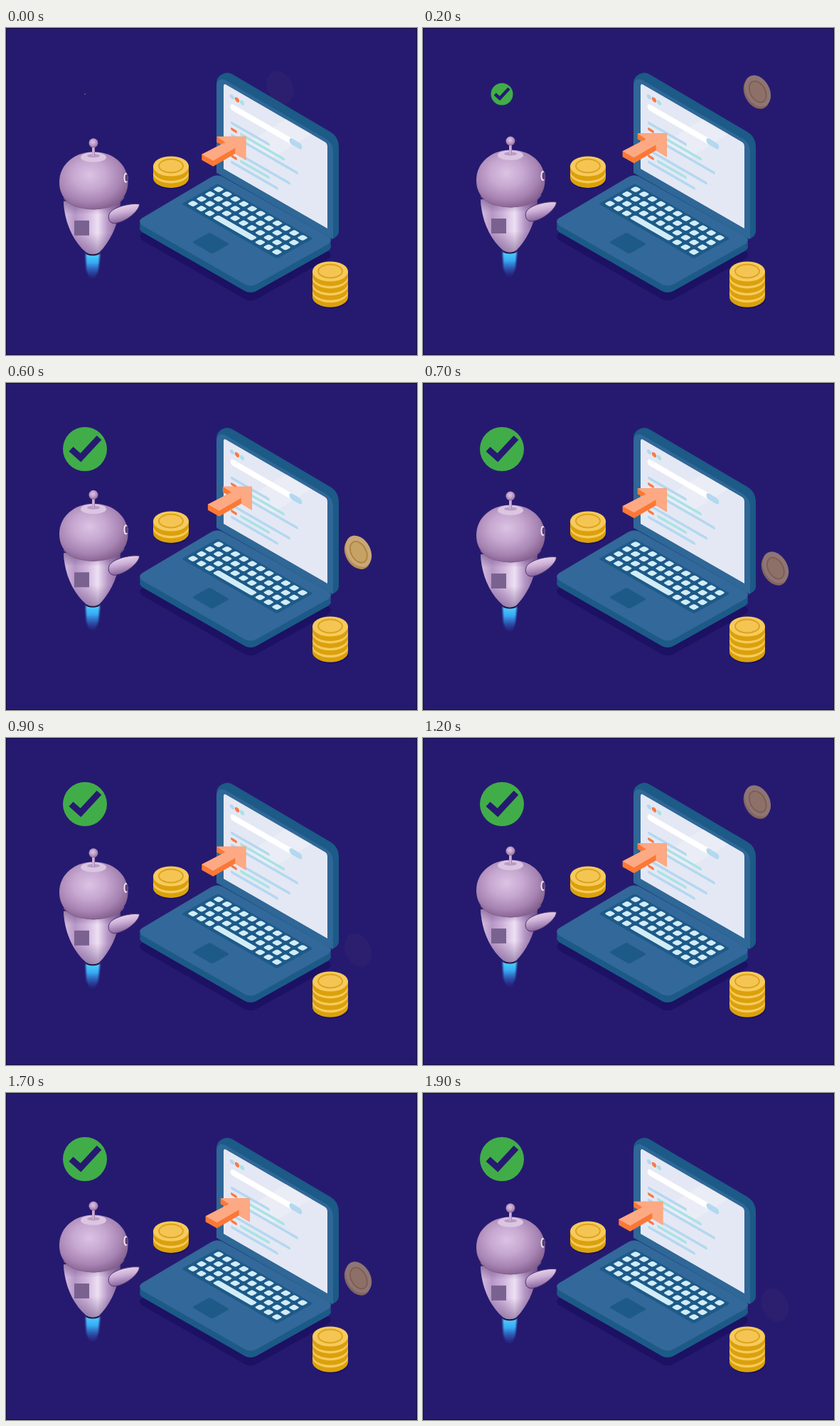
Write an HTML page that moves like this. It is 578 by 460 pixels and loops after 2000 ms.

```html
<!DOCTYPE html>
<html lang="en">
<head>
<meta charset="utf-8">
<title>Robot and laptop</title>
<style>
  html, body { margin: 0; width: 100%; height: 100%; overflow: hidden; background: #261a70; }
  svg { display: block; width: 100vw; height: 100vh; }
</style>
</head>
<body>
<svg viewBox="0 0 578 460">
  <defs>
    <radialGradient id="headFill" cx=".44" cy=".4" r=".62">
      <stop offset="0" stop-color="#dcc3e3"/>
      <stop offset=".4" stop-color="#c6a7d0"/>
      <stop offset=".75" stop-color="#a784b3"/>
      <stop offset="1" stop-color="#85618f"/>
    </radialGradient>
    <linearGradient id="bodyFill">
      <stop offset="0" stop-color="#d6bfe0"/>
      <stop offset=".2" stop-color="#b697c6"/>
      <stop offset=".4" stop-color="#cfb4db"/>
      <stop offset=".6" stop-color="#eee0f4"/>
      <stop offset=".78" stop-color="#b495c4"/>
      <stop offset="1" stop-color="#82609a"/>
    </linearGradient>
    <linearGradient id="bodyShade" x2="0" y2="1">
      <stop offset="0" stop-color="#5b3a74" stop-opacity=".5"/>
      <stop offset=".25" stop-color="#5b3a74" stop-opacity="0"/>
      <stop offset=".6" stop-color="#5b3a74" stop-opacity="0"/>
      <stop offset="1" stop-color="#5b3a74" stop-opacity=".5"/>
    </linearGradient>
    <linearGradient id="armFill" x2=".3" y2="1">
      <stop offset="0" stop-color="#f3e8f6"/>
      <stop offset=".5" stop-color="#ceb1d8"/>
      <stop offset="1" stop-color="#84619a"/>
    </linearGradient>
    <linearGradient id="flameFill" x2="0" y2="1">
      <stop offset="0" stop-color="#4fcfff"/>
      <stop offset=".35" stop-color="#36a9f3"/>
      <stop offset="1" stop-color="#2c5cc8" stop-opacity="0"/>
    </linearGradient>
    <filter id="soft" x="-40%" width="180%"><feGaussianBlur stdDeviation="1.3"/></filter>
    <path id="slab" d="M192 267L288 210Q296 205 304 209L453 293Q461 298 453 304L353 360Q344 365 335 360L192 278Q184 272 192 267Z"/>
    <path id="torso" d="M81 244C82 273 94 300 113 316Q122 321 131 316C147 300 160 274 161 244Z"/>
  </defs>

  <rect width="578" height="460" fill="#261a70"/>
  <rect x=".5" y=".5" width="577" height="459" fill="none" stroke="#130c42"/>

  <!-- laptop -->
  <use href="#slab" y="21" fill="#1c1163"/>
  <path fill="#1c5a87" d="M296 78Q296 67 308 63.500Q314 62 320 66L456 146Q468 153 468 168V287Q467 294 458 297L296 204Z"/>
  <path fill="#2f6797" d="M296 82Q297 69 308 73L450 156Q460 162 460 174V297L296 203Z"/>
  <path fill="#e4e8f4" d="M306 82Q306 77.500 310 80L448 160Q452 162 452 167V282L306 198Z"/>
  <path fill="#fff" opacity=".2" d="M338 162L394 128L430 149L374 183Z"/>
  <g id="page" transform="matrix(1 .575 0 1 306 79)" stroke-linecap="round"></g>
  <g fill="#1c5a87">
    <use href="#slab" y="9.500"/><use href="#slab" y="5"/>
  </g>
  <use href="#slab" fill="#33689a"/>
  <g id="deck" transform="matrix(1.18 .68 -1.2 .67 299 227)" fill="#d2ecf7">
    <rect x="-6.500" y="-5.500" width="113.500" height="42.500" rx="2" fill="#1d5a88"/>
    <rect x="40" y="50" width="24" height="20.500" rx="2" fill="#1d5a88"/>
  </g>

  <g id="arrow">
    <path fill="#fb7836" d="M296 153H337V186L322 177L291 195L275 186V178L302 164L296 161Z"/>
    <path fill="#fda983" d="M296 153H337V186L322 177V169L291 187L275 178L308 161Z"/>
  </g>

  <g id="stacks"></g>

  <g id="coin">
    <g transform="rotate(-29)">
      <ellipse cx="-1.500" cy="1" rx="16.500" ry="23.500" fill="#dfae50"/>
      <ellipse cx="1.500" cy="-1" rx="16.500" ry="23.500" fill="#f6d07a"/>
      <ellipse cx="1" rx="10.500" ry="16" fill="#f3c864" stroke="#d9a235" stroke-width="2"/>
    </g>
  </g>

  <g id="robot">
    <path filter="url(#soft)" fill="url(#flameFill)" d="M112 318H132L130 340Q127 352 122 354Q116 352 113 340Z"/>
    <ellipse cx="122" cy="317" rx="9.500" ry="3.500" fill="#23143f"/>
    <use href="#torso" fill="url(#bodyFill)"/>
    <use href="#torso" fill="url(#bodyShade)"/>
    <rect x="96" y="271" width="21" height="21" fill="#7a6290"/>
    <path fill="url(#headFill)" d="M75 217C75 191 98 174.500 123 174.500C150 174.500 171 191 171.500 217C171.500 241 154 254 123 255.500C93 254 75 242 75 217Z"/>
    <path fill="none" stroke="#86618f" stroke-width="1.200" d="M81 239Q92 254 123 255Q156 254 166 238"/>
    <ellipse cx="168.500" cy="211" rx="3" ry="7" fill="#efe4f4"/>
    <ellipse cx="169.500" cy="211" rx="2" ry="5" fill="#5d3f78"/>
    <ellipse cx="123" cy="182" rx="18" ry="7" fill="#dbc6e2"/>
    <ellipse cx="123" cy="180" rx="9" ry="2.500" fill="#bb9cc5"/>
    <path stroke="#b391bf" stroke-width="4" d="M123 166V180"/>
    <path stroke="#e2d0e8" stroke-width="1.200" d="M122.500 168V180"/>
    <circle cx="123" cy="162" r="6.500" fill="url(#headFill)"/>
    <path fill="url(#armFill)" stroke="#4f3268" d="M145 262C149 252 176 246 187.500 248C188 256 170 273 153 275C145 275 143 268 145 262Z"/>
  </g>

  <g id="badge">
    <circle r="31" fill="#41ad49"/>
    <path fill="none" stroke="#261a70" stroke-width="9" d="M-19.500 0L-6 12L20 -16"/>
  </g>
</svg>

<script>
const $ = id => document.getElementById(id);

function add(parent, tag, attrs) {
  const el = document.createElementNS('http://www.w3.org/2000/svg', tag);
  for (const name in attrs) el.setAttribute(name, attrs[name]);
  parent.append(el);
}

function bar(x1, x2, y, stroke, width = 4) {
  add($('page'), 'path', { d: `M${x1} ${y}H${x2}`, stroke, 'stroke-width': width });
}

function drawPage() {
  const blue = '#b3d8f0', teal = '#a6e3e5', orange = '#fa7a45';
  [blue, orange, teal].forEach((fill, i) =>
    add($('page'), 'circle', { cx: 12 + 7 * i, cy: 11, r: 3.2, fill }));
  bar(14, 106, 25.5, '#fff', 9);
  bar(97, 106, 25.5, blue, 9);
  for (const [y, first, second, third] of [[48, 63, 84, 103], [86, 92, 63, 75]]) {
    bar(12, first, y, blue);
    bar(12, 17, y + 8.6, orange);
    bar(25, second, y + 8.6, teal);
    bar(12, third, y + 17.2, blue);
  }
}

function drawKeys() {
  const key = (col, row, span = 1) => add($('deck'), 'rect', {
    x: col * 10 - 3.3, y: row * 10 - 3.3, width: span * 10 - 3.4, height: 6.6, rx: 1.8
  });
  for (let row = 0; row < 4; row++)
    for (let col = 0; col < 11; col++)
      if (row < 3 || col < 3 || col > 7) key(col, row);
  key(3, 3, 5);
}

function drawStack(cx, top, count) {
  const g = $('stacks'), step = 9.9, rx = 25, ry = 14, rim = 6.5;
  add(g, 'ellipse', { cx: cx + 1, cy: top + step * (count - 1) + rim + 2, rx, ry, fill: '#1c1163' });
  for (let i = count - 1; i >= 0; i--) {
    const y = top + step * i;
    add(g, 'path', {
      d: `M${cx - rx} ${y}v${rim}a${rx} ${ry} 0 0 0 ${2 * rx} 0v${-rim}Z`, fill: '#dba10c'
    });
    add(g, 'ellipse', { cx, cy: y, rx, ry, fill: '#f7ca5c' });
  }
  add(g, 'ellipse', { cx, cy: top - 0.5, rx: 17, ry: 9.5, fill: '#f5c554', stroke: '#dba51e', 'stroke-width': 2 });
}

const ease = u => u * u * (3 - 2 * u);
const bezier = (u, a, b, c, d) => {
  const v = 1 - u;
  return v * v * v * a + 3 * v * v * u * b + 3 * v * u * u * c + u * u * u * d;
};
const place = (id, x, y, extra = '') => $(id).setAttribute('transform', `translate(${x} ${y})${extra}`);

// Everything is keyed at half-second marks; poses are taken mid-step at 10 per second.
function render(ms) {
  const time = Math.floor(ms % 2000 / 100) / 10 + 0.05;
  const phase = time % 1;
  const rising = phase < 0.5;
  const move = ease(rising ? phase * 2 : phase * 2 - 1);
  const swing = rising ? move : 1 - move;

  place('arrow', 11.3 * swing, -9.3 * swing);
  place('robot', 0, -6 * swing);
  place('badge', 111, 93, ` scale(${ease(Math.min(1, time * 2))})`);

  if (rising) place('coin', bezier(move, 378, 467, 495, 495), bezier(move, 92, -6, 142, 221));
  else place('coin', 495, 221 + 80 * move);
  $('coin').setAttribute('opacity', swing);
}

drawPage();
drawKeys();
drawStack(232, 194.5, 2);
drawStack(456, 342.5, 4);

const start = performance.now();
function tick() {
  render(performance.now() - start);
  requestAnimationFrame(tick);
}
tick();
</script>
</body>
</html>
```
